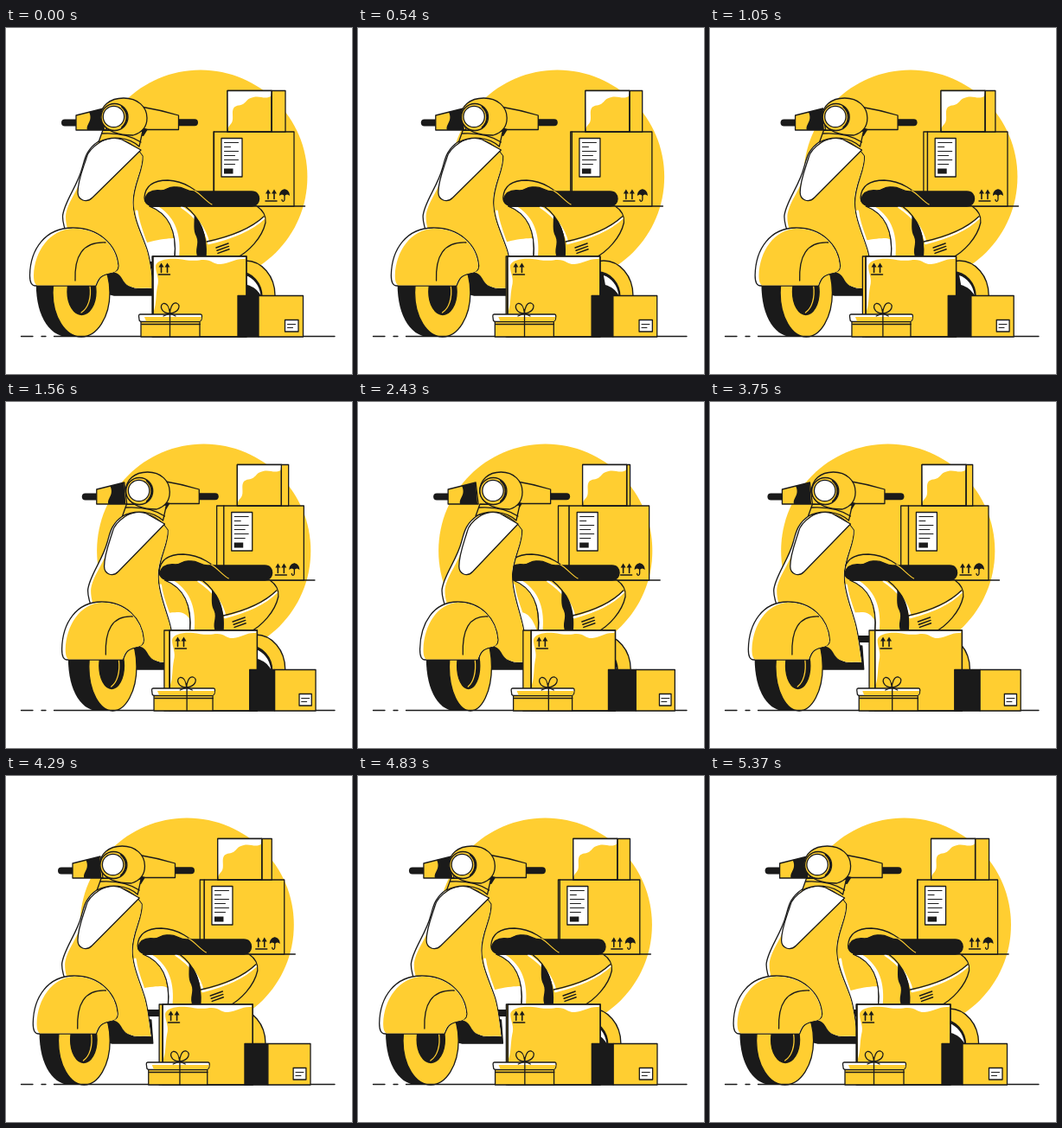
Recreate the animation shown at these times as an HTML page. Size 400x400 px, loop 5.4 s.

```html
<!DOCTYPE html>
<html lang="en">
<head>
<meta charset="utf-8">
<title>Delivery scooter</title>
<style>
html, body { margin: 0; width: 100%; height: 100%; overflow: hidden; background: #fff; }
svg { display: block; width: 100%; height: 100%; }
path { stroke-linecap: round; stroke-linejoin: round; }
</style>
</head>
<body>
<svg id="stage" viewBox="0 0 400 400"></svg>
<script>
const YELLOW = '#ffce31', BLACK = '#1a1a1a', WHITE = '#fff', NONE = 'none';
const LOOP = 5400, STEP = 30;
const stage = document.getElementById('stage');
const shapes = [];

// Points are "x,y" or "x,y,depth". The camera circles: every point sways
// together, and shifts further sideways the nearer it is.
let sway = 11.7;

// depth: a number, or [x1, d1, x2, d2] for a slope across the shape
function add(path, depth, fill = NONE, stroke = BLACK, width = 1.3) {
  const el = document.createElementNS('http://www.w3.org/2000/svg', 'path');
  el.setAttribute('fill', fill);
  el.setAttribute('stroke', stroke);
  el.setAttribute('stroke-width', width);
  stage.appendChild(el);
  shapes.push({ el, path, sway, depthAt: slope(depth) });
}
const fill = (path, depth, color) => add(path, depth, color, NONE, 0);
const line = (path, depth, color, width) => add(path, depth, NONE, color, width);

function slope(depth) {
  if (typeof depth === 'number') return () => depth;
  const [x1, d1, x2, d2] = depth;
  return x => d1 + (d2 - d1) * (x - x1) / (x2 - x1);
}

function ellipse(cx, cy, rx, ry = rx) {
  const k = 0.5523, a = rx * k, b = ry * k;
  return `M${cx - rx},${cy} C${cx - rx},${cy - b} ${cx - a},${cy - ry} ${cx},${cy - ry}` +
    ` C${cx + a},${cy - ry} ${cx + rx},${cy - b} ${cx + rx},${cy}` +
    ` C${cx + rx},${cy + b} ${cx + a},${cy + ry} ${cx},${cy + ry}` +
    ` C${cx - a},${cy + ry} ${cx - rx},${cy + b} ${cx - rx},${cy} Z`;
}
const rect = (x1, y1, x2, y2, d1 = '', d2 = d1) => {
  const l = d1 === '' ? '' : ',' + d1, r = d2 === '' ? '' : ',' + d2;
  return `M${x1},${y1}${l} L${x2},${y1}${r} L${x2},${y2}${r} L${x1},${y2}${l} Z`;
};

function upArrows(x, y, depth) {
  for (const ax of [x + 3, x + 10]) {
    line(`M${ax},${y + 11} L${ax},${y + 3}`, depth, BLACK, 1.6);
    fill(`M${ax - 3},${y + 5} L${ax},${y} L${ax + 3},${y + 5} Z`, depth, BLACK);
  }
  line(`M${x},${y + 13.5} L${x + 13},${y + 13.5}`, depth, BLACK, 1.5);
}

function backdrop() {
  fill(ellipse(224.8, 172, 123.6), -6, YELLOW);
  fill('M138,258 C160,246 185,243 196,243 C207,244 212,255 216,268 L216,300 L138,300 Z', -6, WHITE);
}

function rearParcels() {
  line('M190,206 L345.5,206', 0, BLACK, 1.5);
  add(rect(240, 120, 240.5, 206, -6.2, 0), 0, YELLOW);
  add(rect(240.5, 120, 333, 206), 0, YELLOW);
  add(rect(249, 127.5, 273, 172), 0.3, WHITE);
  [16, 7, 16, 12, 16, 12].forEach((w, i) =>
    line(`M252.5,${132.5 + i * 5} L${252.5 + w},${132.5 + i * 5}`, 0.3, BLACK, 1.1));
  fill(rect(252, 162.5, 262.5, 168.5), 0.3, BLACK);
  upArrows(300, 186.5, 0);
  fill('M316,194 C316,184 328,184 328,194 C326,192 324,192 322,194 C320,192 318,192 316,194 Z', 0, BLACK);
  line('M322,187 L322,198 C322,201 319,201 319,198.5', 0, BLACK, 1.3);

  add(rect(307, 72.5, 323, 120, 0, -6.2), 0, YELLOW);
  add(rect(256, 72.5, 307, 120), 0, YELLOW);
  fill('M256,72.5 L307,72.5 L306,79 C299,83 294,78 286,80 C276,82 279,88 269,89.5' +
    ' C259,91 263,100 262,106 C261,113 257,111 256.5,118 Z', 0, WHITE);
  line(rect(256, 72.5, 307, 120), 0);
}

function rearBody() {
  add(ellipse(277, 309, 34, 40), 0.3, YELLOW);
  add(ellipse(270, 311, 26, 29), 0.3, BLACK);
  fill('M277,286 C286,289 293,297 294.5,309 C291,303 286,299 279,297 Z', 0.3, WHITE);

  const body = [190, 5, 300, 2.8];
  add('M166,206 C187,214 198,234 195,266 L266,266 C280,259 296,243 300,225' +
    ' C301,216 296,210 290,206 Z', body, YELLOW);
  fill('M168,207 L177,207 C196,219 203,240 200,266 L195.5,266 C198,234 187,215 168,207 Z', 5, WHITE);
  line('M166,206 C187,214 198,234 195,266', 5);
  line('M203,207 C218,217 230,230 234,248', 6.5, WHITE, 2.4);
  line('M207,206 C223,218 233,238 231,266', 6.8);
  fill('M217.5,217 C229,227 233,247 231,266 L222,266 C217,256 224,250 220,241' +
    ' C216,234 218,225 217.5,217 Z', 7.3, BLACK);
  line('M234,249 C260,243 284,233 298,220', [234, 6.3, 298, 2.6], WHITE, 2.4);
  line('M232,247 C260,241 284,231 298,218', [232, 6.3, 298, 2.6]);
  for (let i = 0; i < 3; i++)
    line(`M${243 + i},${254 + i * 3.2} L${257 + i * 0.5},${249 + i * 3.4}`, 6.3, BLACK, 1.5);
}

function seat() {
  const depth = [160, 4.7, 293, 3];
  add('M160,196 C161,181 172,176 187,176 C211,177 224,192 238,204 L170,206' +
    ' C163,205 160,202 160,196 Z', [160, 4.7, 238, 6.4], YELLOW);
  add('M160.5,198 C161,203 166,206 172,206 L284,206 C295,206 296,189 284,189 L217,189' +
    ' C208,189 205,183 196,184 C187,183 186,188 179,188 C171,187 163,189 160.5,198 Z', depth, BLACK);
  line('M218,188 C226,193 231,200 238,204', 6.4, YELLOW, 1.1);
}

function legShield() {
  fill(rect(150, 270, 190, 278), 5, BLACK);
  add('M113,282 L170,282 L172,309 L125,309 C118,308 113,305 108,300 Z', 12.5, BLACK);
  line('M151,212 C153,230 161,244 167,264', 13, WHITE, 3);

  const edge = 'M107,131 C92,141 91,152 88,162 C83,182 66,203 65.5,218 C65.5,228 69,236 73,246' +
    ' L110,284 L120,283 C137,281 132,295 143,299 C152,304 160,300 171,302,12' +
    ' C169,285,11.5 167,268,11.5 163,256,12 C157,238,13 147,220 147,202' +
    ' C147,180 159,165 158,148 C148,133 130,123 107,131 Z';
  add(edge, 14.3, WHITE);
  fill('M107,132 C95,142 94,152 91,164 C86,184 69.5,203 69,218 C69,228 72,236 76,246' +
    ' L110,284 L120,282.5 C136,281 132,294 143,298.5 C152,303 160,299 170,301,12' +
    ' C168.5,285,11.5 166,268,11.5 162.5,256,12 C156,238,13 146.5,220 146.5,202' +
    ' C146.5,180 158,165 157.5,148 C148,133 130,124 107,132 Z', 14.3, YELLOW);
  add('M108,132.5 C116,127 127,126 134,129 L156,141 L100,196 C93,203 83,199 83,190' +
    ' C83,176 90,160 93,150 C95,142 101,137 108,132.5 Z', [85, 15.4, 156, 13], WHITE);
}

function handlebar() {
  const depth = 10;
  line('M68,109.5 L84,109.5', depth, BLACK, 8);
  line('M197,109.3 L218,109.3', depth, BLACK, 8);
  add('M81,101 L113,93 L116,118 L81,118 Z', depth, YELLOW);
  fill('M96,97 L112,93.5 L114,118 L94,118 C92,111 101,108 96,97 Z', 10.5, BLACK);
  add('M156,91 C168,93 186,97 199.5,101 L199.5,117.5 L154,117.5 Z', depth, YELLOW);
  fill('M154,114 L164,117 L159,125 L152,124 Z', 11.5, BLACK);

  add('M112,118 L107,132 C122,124 142,126 154,137 L158,119 Z', 13, YELLOW);
  line('M111,122 C128,121 144,124 156,132', 13);
  add('M109,104 C109,90 120,81 136,81 C152,81 163,91 163,104 C163,114 157,121 147,124' +
    ' C134,124 112,121 109,104 Z', [110, 14.3, 163, 12], YELLOW);
  add(ellipse(125.5, 103, 15.5), 14, YELLOW);
  line('M134,91 C142,98 141,109 134,115', 14, BLACK, 2);
  add(ellipse(124.5, 102.5, 12.2), 14.3, WHITE);
}

function frontWheel() {
  fill('M35,290 C33,328 48,357 72,357 L92,357 L92,290 Z', [35, 20.7, 92, 18], BLACK);
  add(ellipse(87, 306, 33, 51), [54, 24.5, 120, 15.8], YELLOW);
  const hub = [71, 20.5, 104, 17];
  add(ellipse(87.5, 305, 16.5, 26.5), hub, BLACK);
  line('M97,298 C99,312 95,324 87,329', hub, YELLOW, 1.3);

  const depth = [28, 20.7, 130, 14.5];
  add('M34,298 C29,298 27.5,293 27.5,286 C28,255 46,231 77,231 C107,231 128,250 130,275' +
    ' C130,281 126,283 119,284 C109,286 107,290 104,298 Z', depth, WHITE);
  fill('M36,297.5 C33,296 32,292 32,286 C33,258 50,233 78,231.7 C107,232 127,250 129.4,275' +
    ' C129,281 126,282.5 119,283.5 C108,286 106,290 103.5,297.5 Z', depth, YELLOW);
  line('M80,292 C79,264 88,247 115,248', [80, 19.3, 115, 16]);
}

function frontParcels() {
  sway = 0;
  add(rect(169, 264, 170, 357, 11.2, 15.5), 0, YELLOW);
  add(rect(170, 264, 278, 357, 15.5, 10), 0, YELLOW);
  const face = [170, 15.5, 278, 10];
  fill('M170.5,264.5 L277,264.5 L276.5,267 C265,266 259,272 248,273 C238,273 238,267 226,268' +
    ' C214,270 208,268 199,267 C188,266 174,268 173,275 C173,284 178,289 175,299' +
    ' C173,309 174,318 171,327 Z', face, WHITE);
  line(rect(170, 264, 278, 357, 15.5, 10), 0);
  upArrows(176.5, 271.5, 15.3);

  add(rect(268, 309.5, 292, 357, 11, 15), 0, BLACK);
  add(rect(292, 309.5, 343.5, 357, 15, 11.7), 0, YELLOW);
  add(rect(322.5, 337.5, 338, 351, 13.3, 12.3), 0, WHITE);
  line('M325.5,342.5 L334.5,342.5 M325.5,346.5 L331.5,346.5', 13, BLACK, 1.1);

  add(rect(156, 339, 224, 357), 12.1, YELLOW);
  line('M157,342.5 L224,342.5', 12.1, BLACK, 1.6);
  add('M155,331 L225,331 Q226.5,331 226.5,333 L226,337 Q225,339.5 223,339.5 L157,339.5' +
    ' Q154,339.5 154,337 L153.5,333 Q153.5,331 155,331 Z', 12.1, WHITE);
  fill('M160,334 L226,334 L225.5,337 Q225,339 223,339 L162,339 Z', 12.1, YELLOW);
  line('M189.5,331 L189.5,357', 15.8);
  line('M189.5,330 C179,330 177,320 182,318.5 C187,318 189,325 189.5,330' +
    ' C189.5,325 192,317 197,318 C203,320 200,329 189.5,330 L182,333 M189.5,330 L196,333', 15.5);
}

backdrop();
rearParcels();
rearBody();
seat();
legShield();
handlebar();
frontWheel();
sway = 0;
line('M17.5,356.5 L31,356.5 M41,356.5 L46,356.5 M55.5,356.5 L380,356.5', 0);
frontParcels();

const POINT = /(-?[\d.]+),(-?[\d.]+)(?:,(-?[\d.]+))?/g;

function draw(time) {
  const angle = Math.floor(time % LOOP / STEP) * STEP / LOOP * 2 * Math.PI;
  const side = Math.sin(angle), turn = 1 - Math.cos(angle);
  for (const s of shapes) {
    s.el.setAttribute('d', s.path.replace(POINT, (_, x, y, d) => {
      const depth = d === undefined ? s.depthAt(+x) : +d;
      return (+x + s.sway * side + depth * turn).toFixed(2) + ',' + y;
    }));
  }
}

const start = performance.now();
function tick() {
  draw(performance.now() - start);
  requestAnimationFrame(tick);
}
tick();
</script>
</body>
</html>
```
